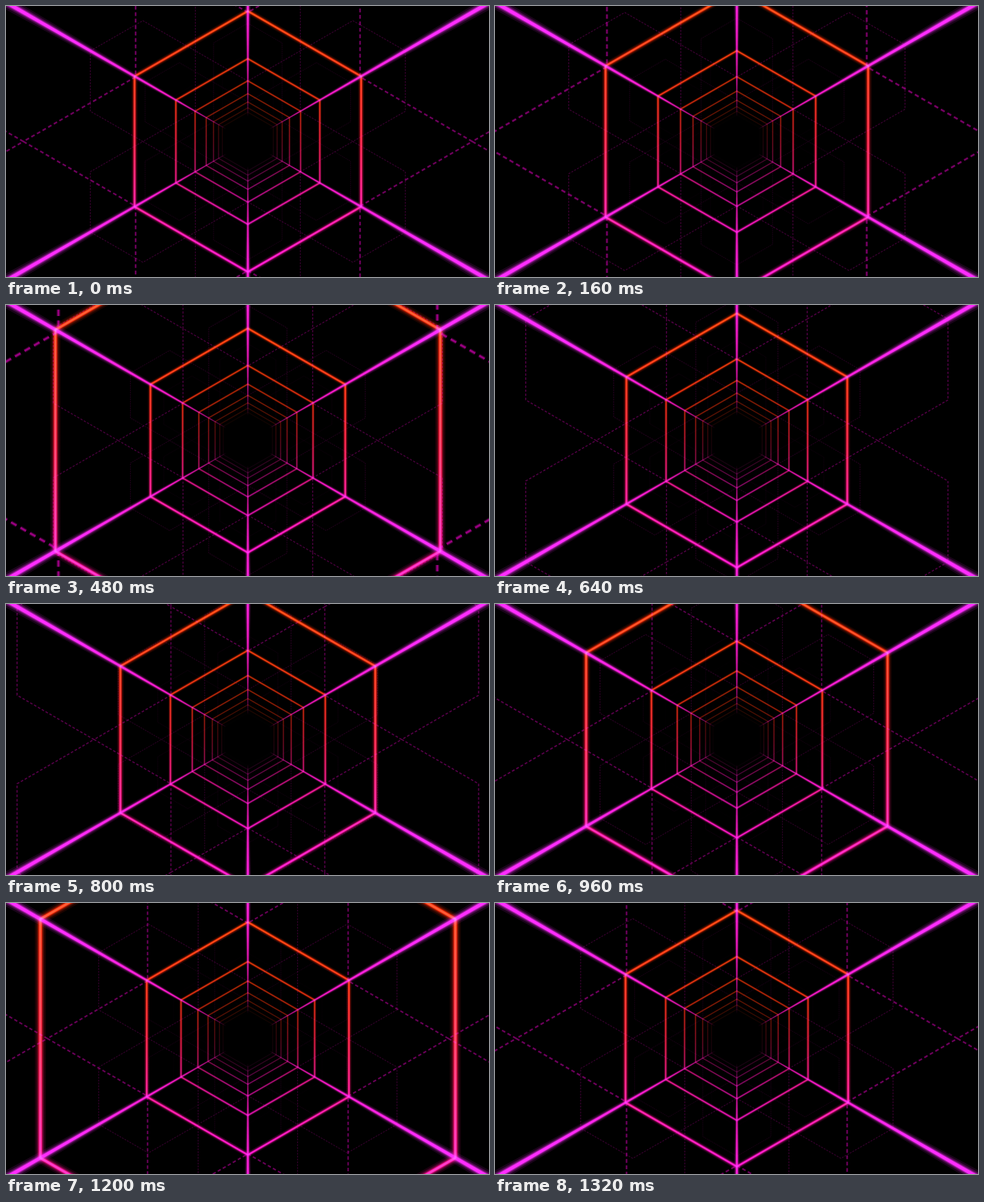
An HTML page for the animation above (1360 ms loop, 700x394 px).

```html
<!DOCTYPE html>
<html lang="en">
<head>
<meta charset="utf-8">
<title>Hexagon tunnel</title>
<style>
  html, body { margin: 0; width: 100%; height: 100%; overflow: hidden; background: #000; }
  svg { display: block; width: 100vw; height: 100vh; }
  #scene { isolation: isolate; }
  #scene > g { mix-blend-mode: screen; }
</style>
</head>
<body>
<svg id="stage" viewBox="0 0 700 394">
  <defs>
    <linearGradient id="heat" x1="0" y1="0" x2="0" y2="1">
      <stop offset="0" stop-color="#ff3200"/>
      <stop offset=".27" stop-color="#ff2808"/>
      <stop offset=".5" stop-color="#ff1438"/>
      <stop offset=".75" stop-color="#ff0f8c"/>
      <stop offset="1" stop-color="#ff0cbe"/>
    </linearGradient>
    <linearGradient id="core" x1="0" y1="0" x2="0" y2="1">
      <stop offset="0" stop-color="#ff6a28"/>
      <stop offset=".27" stop-color="#ff5a38"/>
      <stop offset=".5" stop-color="#ff4a6c"/>
      <stop offset=".75" stop-color="#ff3cc8"/>
      <stop offset="1" stop-color="#ff30f0"/>
    </linearGradient>
    <radialGradient id="beam" gradientUnits="userSpaceOnUse" cx="0" cy="0" r="420"></radialGradient>
  </defs>
  <rect width="700" height="394" fill="#000"/>
  <g id="scene" transform="translate(350.5 197)"></g>
</svg>
<script>
const NS = 'http://www.w3.org/2000/svg';
const LOOP = 1360, STEP = 40;
// Depth is the reciprocal of a ring's radius in pixels.
const NEAR = 0.005274, GAP = 0.00303, SPEED = 4.52e-6, FAR = 0.026;
// Soft halo layers: line width for radius 1, and opacity.
const HALO = [[0.046, 0.1], [0.032, 0.2], [0.021, 0.45], [0.013, 1]];
const scene = document.getElementById('scene');
const beam = document.getElementById('beam');

function add(parent, tag, attrs) {
  const el = document.createElementNS(NS, tag);
  for (const key in attrs) el.setAttribute(key, attrs[key]);
  return parent.appendChild(el);
}

const clamp = v => Math.max(0, Math.min(1, v));
const fade = depth => clamp((FAR - depth) / 0.02);
const polar = (r, i) => {
  const a = (i * 60 - 90) * Math.PI / 180;
  return [r * Math.cos(a), r * Math.sin(a)];
};

function hexPath(cx, cy) {
  const pts = [];
  for (let i = 0; i < 6; i++) {
    const [x, y] = polar(1, i);
    pts.push((cx + x).toFixed(4) + ' ' + (cy + y).toFixed(4));
  }
  return 'M' + pts.join('L') + 'Z';
}

const center = hexPath(0, 0);
let around = '';
for (let i = 0; i < 6; i++) around += hexPath(...polar(2, i));

// Beams turn from deep pink to bright magenta as they come closer.
for (let r = 36; r <= 420; r += 16) {
  const k = clamp(r / 300);
  add(beam, 'stop', {
    offset: r / 420,
    'stop-color': `rgb(255,${Math.round(10 + 35 * k)},${Math.round(165 + 90 * k)})`,
    'stop-opacity': fade(1 / r).toFixed(3)
  });
}

function makeRing(j) {
  const web = j % 2 === 0 ? add(scene, 'g', {
    fill: 'none', stroke: '#d200b0', 'stroke-dasharray': '.029 .021'
  }) : null;
  if (web) {
    add(web, 'path', { d: around, 'stroke-width': 0.018, 'stroke-opacity': 0.3 });
    add(web, 'path', { d: around, 'stroke-width': 0.009 });
  }
  const ring = add(scene, 'g', { fill: 'none', stroke: 'url(#heat)', 'stroke-linejoin': 'round' });
  for (const [width, alpha] of HALO) {
    add(ring, 'path', { d: center, 'stroke-width': width, 'stroke-opacity': alpha });
  }
  const core = add(ring, 'path', { d: center, stroke: 'url(#core)', 'stroke-width': 0.009 });
  return { j, web, ring, core };
}

const rings = [];
for (let j = 10; j >= -1; j--) rings.push(makeRing(j));

// Rays widen with distance from the vanishing point.
for (let i = 0; i < 6; i++) {
  const ray = add(scene, 'g', { transform: `rotate(${i * 60})`, fill: 'url(#beam)' });
  for (const [width, opacity] of HALO) {
    const x = 210 * width;
    add(ray, 'path', { d: `M0 0L${-x} -420L${x} -420Z`, opacity });
  }
}

function place(el, depth, opacity) {
  const shown = depth > 0.0018 && depth < FAR;
  el.setAttribute('display', shown ? 'inline' : 'none');
  if (!shown) return;
  el.setAttribute('transform', `scale(${(1 / depth).toFixed(3)})`);
  el.setAttribute('opacity', opacity.toFixed(3));
}

function draw(now) {
  const t = Math.floor((now % LOOP) / STEP) * STEP;
  for (const { j, web, ring, core } of rings) {
    const depth = NEAR + GAP * j - SPEED * t;
    place(ring, depth, fade(depth));
    core.setAttribute('opacity', clamp(1 / (300 * depth)).toFixed(3));
    if (web) {
      const back = depth + 0.00005;
      place(web, back, fade(back) * clamp(0.35 + 0.0012 / back));
    }
  }
}

function tick() {
  draw(performance.now());
  requestAnimationFrame(tick);
}
tick();
</script>
</body>
</html>
```
